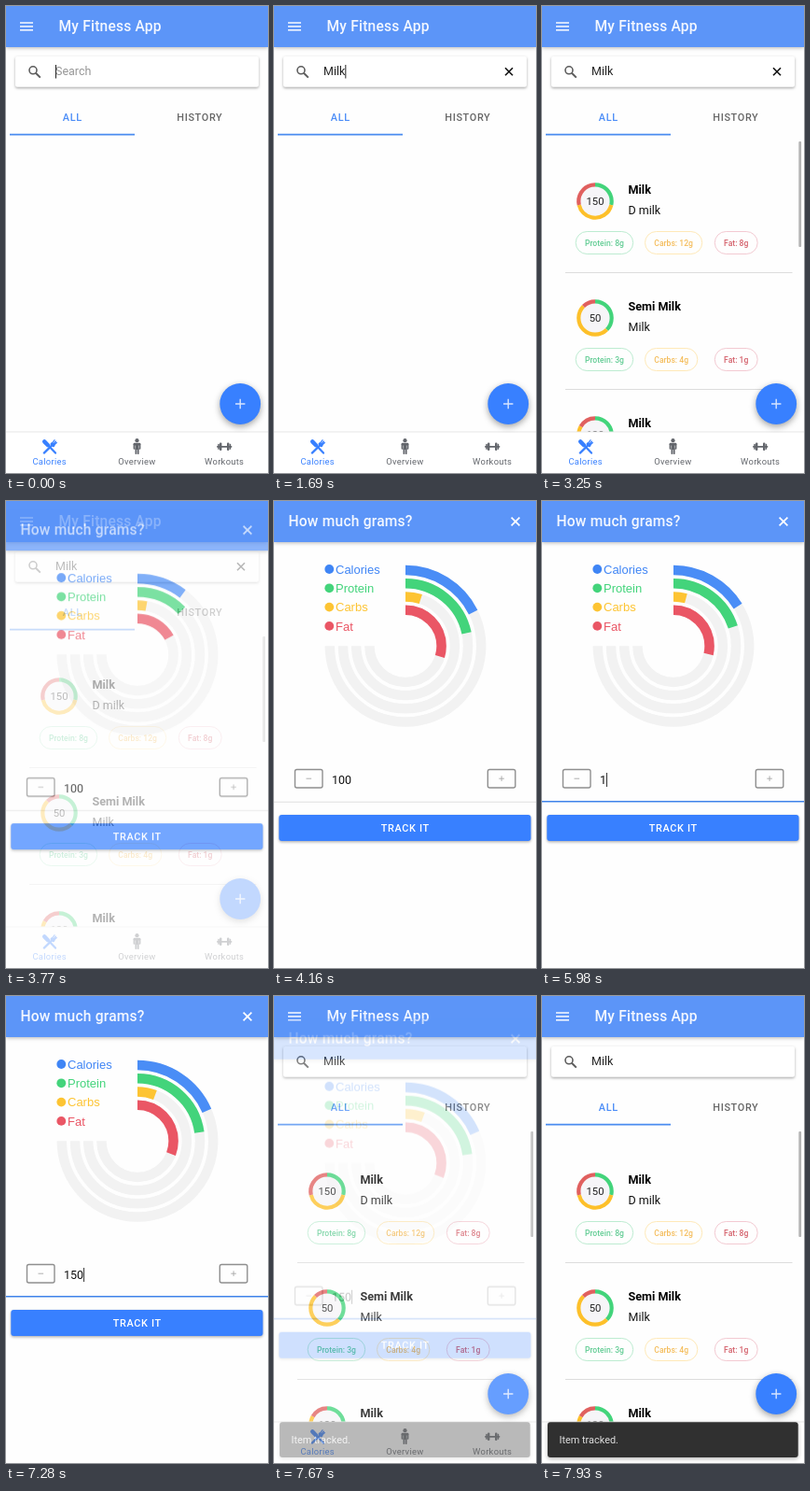
These frames come from a looping animation (281x500 px, 8 s). An HTML page with a canvas:

```html
<!DOCTYPE html>
<html lang="en">
<head>
<meta charset="utf-8">
<title>Fitness app</title>
<style>
html, body { margin: 0; width: 100%; height: 100%; overflow: hidden; background: #fff; }
canvas { display: block; width: 281px; height: 500px; }
</style>
</head>
<body>
<canvas id="stage"></canvas>
<script>
const W = 281, H = 500, LOOP = 8000, STEP = 130;
const BLUE = '#3880ff', BAR = '#5c95f8', GREEN = '#43d47b', YELLOW = '#fdc433', RED = '#ea5665';
const dpr = window.devicePixelRatio || 1;

function setup(canvas) {
  canvas.width = Math.round(W * dpr);
  canvas.height = Math.round(H * dpr);
  const ctx = canvas.getContext('2d');
  ctx.scale(dpr, dpr);
  return ctx;
}
const screen = setup(document.getElementById('stage'));
const buffer = setup(document.createElement('canvas'));
let c = screen;

const clamp = x => Math.max(0, Math.min(1, x));
const easeOut = x => 1 - Math.pow(1 - clamp(x), 3);
const mix = (a, b, p) => a.map((v, i) => v + (b[i] - v) * p);

// ---- drawing helpers ----
function text(s, x, y, size, color, { weight = 400, align = 'left', gap = 0, family = 'Roboto' } = {}) {
  c.font = `${weight} ${size}px ${family}, sans-serif`;
  c.letterSpacing = gap + 'px';
  c.textAlign = 'left';
  c.fillStyle = color;
  const w = c.measureText(s).width;
  c.fillText(s, align === 'center' ? x - (w - gap) / 2 : x, y);
  c.letterSpacing = '0px';
  return w;
}

function rect(x, y, w, h, color, r = 0) {
  c.fillStyle = color;
  c.beginPath();
  c.roundRect(x, y, w, h, r);
  c.fill();
}

function outline(x, y, w, h, color, r, width) {
  c.strokeStyle = color;
  c.lineWidth = width;
  c.beginPath();
  c.roundRect(x, y, w, h, r);
  c.stroke();
}

function line(color, width, ...pts) {
  c.strokeStyle = color;
  c.lineWidth = width;
  c.beginPath();
  for (let i = 0; i < pts.length; i += 4) {
    c.moveTo(pts[i], pts[i + 1]);
    c.lineTo(pts[i + 2], pts[i + 3]);
  }
  c.stroke();
}

function disc(x, y, r, color) {
  c.fillStyle = color;
  c.beginPath();
  c.arc(x, y, r, 0, Math.PI * 2);
  c.fill();
}

// Angles in degrees, clockwise from the top.
function arc(x, y, r, from, to, width, color) {
  if (to <= from) return;
  c.strokeStyle = color;
  c.lineWidth = width;
  c.beginPath();
  c.arc(x, y, r, (from - 90) * Math.PI / 180, (to - 90) * Math.PI / 180);
  c.stroke();
}

function shadowed(blur, dy, alpha, draw) {
  c.save();
  c.shadowColor = `rgba(0,0,0,${alpha})`;
  c.shadowBlur = blur * dpr;
  c.shadowOffsetY = dy * dpr;
  draw();
  c.restore();
}

const cross = (x, y, r, color, w) => line(color, w, x - r, y - r, x + r, y + r, x - r, y + r, x + r, y - r);

function group(alpha, dy, draw) {
  if (alpha <= 0) return;
  buffer.clearRect(0, 0, W, H);
  c = buffer;
  draw();
  c = screen;
  c.globalAlpha = alpha;
  c.drawImage(buffer.canvas, 0, dy, W, H);
  c.globalAlpha = 1;
}

function header(title, x) {
  shadowed(4, 1.2, 0.28, () => rect(0, 0, W, 43.9, BAR));
  text(title, x, 27.3, 15.6, '#f3f7ff', { weight: 500, gap: 0.2 });
}

// ---- main page ----
function searchBar(query, caret, clear) {
  shadowed(3, 1.2, 0.34, () => rect(10, 54, 261, 32.7, '#fff', 2));
  c.strokeStyle = '#5c5c5c';
  c.lineWidth = 1.6;
  c.beginPath();
  c.arc(29, 68.8, 4, 0, Math.PI * 2);
  c.stroke();
  line('#5c5c5c', 2, 31.9, 71.7, 36.8, 76.6);
  let w = 0;
  if (query) w = text(query, 53, 74.1, 12.5, '#222');
  else text('Search', 53, 74.1, 12.5, '#969696');
  if (caret) rect(53 + w, 63, 1, 14.5, '#222');
  if (clear) cross(252, 70.3, 4, '#111', 1.6);
}

function segments() {
  text('ALL', 71, 123.3, 10.9, '#4a8cf7', { weight: 500, align: 'center', gap: 0.66 });
  text('HISTORY', 207.5, 123.3, 10.9, '#666', { weight: 500, align: 'center', gap: 0.66 });
  rect(4, 136.8, 134, 1.6, '#4a8cf0');
}

const FOODS = [
  { name: 'Milk', note: 'D milk', kcal: 150, grams: [8, 12, 8] },
  { name: 'Semi Milk', note: 'Milk', kcal: 50, grams: [3, 4, 1] },
  { name: 'Milk', note: 'Milk', kcal: 120, grams: [8, 12, 4] }
];
const CHIPS = [
  ['Protein', 36.2, '#62cc94', '#bdecd1'],
  ['Carbs', 110.5, '#f4bd5c', '#ffe9b8'],
  ['Fat', 185.3, '#d4626c', '#f3cad2']
];

function foodRow(food, y, sweep) {
  const total = food.grams.reduce((a, b) => a + b);
  disc(57, y, 17, '#f6f5f8');
  let from = 0;
  food.grams.forEach((g, i) => {
    const to = from + g / total * 360 * sweep;
    arc(57, y, 17.7, from, to, 4.2, [GREEN, '#fdc02a', '#e0605f'][i]);
    from = to;
  });
  text(food.kcal, 57, y + 4.1, 11.3, '#222', { align: 'center' });
  text(food.name, 92.5, y - 8, 12.6, '#000', { weight: 700 });
  text(food.note, 92.5, y + 14.2, 12.5, '#111');
  CHIPS.forEach(([label, x, ink, edge], i) => {
    const w = text(`${label}: ${food.grams[i]}g`, x + 9.8, y + 47.8, 8.6, ink, { weight: 500 });
    outline(x, y + 32.5, w + 19.6, 24, edge, 12, 1);
  });
  rect(25, y + 76, 243.5, 1, '#dcdcdc');
}

function foodList(sweep) {
  c.save();
  c.beginPath();
  c.rect(0, 139, W, 317);
  c.clip();
  FOODS.forEach((food, i) => foodRow(food, 209 + i * 125, sweep));
  c.restore();
  rect(275.3, 145, 2.8, 113, '#b4b4b4', 1);
}

function cutleryIcon() {
  c.lineCap = 'round';
  line(BLUE, 2.2, 41, 466, 53, 478.6);
  line(BLUE, 4.4, 41.2, 466.4, 45, 470.2);
  line(BLUE, 2.2, 40.8, 478.6, 50, 469.6);
  line(BLUE, 1.3, 49, 468.6, 52, 464.8, 50.6, 469.2, 53.4, 466.2, 51, 470.6, 54.4, 467.6);
  line(BLUE, 3.4, 49.2, 469, 50.8, 470.4);
  c.lineCap = 'butt';
}

function manIcon(ink) {
  disc(140.5, 465.2, 2.1, ink);
  rect(136.6, 467.8, 7.8, 2.6, ink, 1.3);
  rect(136.6, 468.6, 1.5, 6.2, ink, 0.7);
  rect(142.9, 468.6, 1.5, 6.2, ink, 0.7);
  rect(138.5, 468, 4, 7, ink);
  rect(138.5, 473, 1.8, 7, ink, 0.7);
  rect(140.8, 473, 1.8, 7, ink, 0.7);
}

function barbellIcon(ink) {
  rect(226, 470.9, 16.4, 1.8, ink, 0.8);
  for (const x of [229, 237]) rect(x, 467.6, 2.4, 8.4, ink, 1);
  for (const x of [227.2, 239.6]) rect(x, 468.8, 1.6, 6, ink, 0.6);
}

function tabBar() {
  rect(0, 456, W, 44, '#fff');
  rect(0, 455.5, W, 1, '#e8e8e8');
  const ink = '#63666c';
  cutleryIcon();
  manIcon(ink);
  barbellIcon(ink);
  [['Calories', 46.5, BLUE], ['Overview', 140.3, ink], ['Workouts', 234, ink]].forEach(([s, x, color]) =>
    text(s, x, 490.8, 9.4, color, { align: 'center', gap: 0.28 }));
}

function addButton() {
  shadowed(7, 2.5, 0.36, () => disc(251.2, 426, 21.9, BLUE));
  line('#d6e4ff', 1.4, 246, 426, 256.4, 426, 251.2, 420.8, 251.2, 431.2);
}

function mainPage(t) {
  rect(0, 0, W, H, '#fefefe');
  header('My Fitness App', 56.5);
  for (const y of [18, 21.9, 25.8]) line('#f3f7ff', 1.56, 15, y, 29, y);
  const query = t < 1300 ? '' : t < 1430 ? 'M' : t < 1690 ? 'Mil' : 'Milk';
  const caret = t < 520 || (t >= 1040 && t < 2210) || (t >= 2730 && t < 3250);
  searchBar(query, caret, query && t < 7500);
  segments();
  if (t >= 2080) foodList(easeOut((t - 1950) / 780));
  tabBar();
  addButton();
}

// ---- tracking sheet ----
const RINGS = [['Calories', '#4a8df6'], ['Protein', GREEN], ['Carbs', YELLOW], ['Fat', RED]];
const NONE = [0, 0, 0, 0];
const FIRST = [63.5, 78, 18, 107];
const LOW = [58.3, 72.3, 14.7, 103];
const LAST = [66.4, 82, 21, 111];

function ringAngles(t) {
  if (t < 5720) return mix(NONE, FIRST, easeOut((t - 3640) / 520));
  if (t < 6110) return mix(FIRST, LOW, easeOut((t - 5590) / 390));
  return mix(LOW, LAST, easeOut((t - 6110) / 650));
}

function chart(t) {
  const ends = ringAngles(t);
  RINGS.forEach(([label, color], i) => {
    const r = 81.2 - i * 14.2, y = 73 + i * 20.3;
    arc(141, 155.3, r, 0, 270, 10.5, '#f2f2f2');
    arc(141, 155.3, r, 0, ends[i], 10.5, color);
    const ink = i ? color : '#3f85f5';
    disc(59.3, y, 4.9, ink);
    text(label, 66, y + 4.6, 13, ink, { family: '"Liberation Sans"' });
  });
}

function stepButton(x, plus) {
  outline(x, 287.5, 29.5, 19.5, '#8f8f8f', 2, 1.4);
  const cx = x + 14.8, cy = 297.2;
  line('#a8a8a8', 0.9, cx - 2.8, cy, cx + 2.8, cy);
  if (plus) line('#a8a8a8', 0.9, cx, cy - 2.8, cx, cy + 2.8);
}

function sheet(t) {
  rect(0, 0, W, H, '#fefefe');
  header('How much grams?', 15.5);
  cross(259, 22, 4.4, '#fff', 1.7);
  chart(t);
  stepButton(22.5, false);
  stepButton(229.3, true);
  const grams = t < 5720 ? '100' : t < 5850 ? '10' : t < 6110 ? '1' : t < 6240 ? '15' : '150';
  const w = text(grams, 62, 302.6, 12.5, '#111');
  const focus = t >= 5070;
  const caret = focus && !(t >= 5590 && t < 5720) && !(t >= 6760 && t < 7280);
  if (caret) rect(62 + w, 291, 1, 15, '#333');
  if (focus) rect(0, 320.9, W, 1.7, '#3f83ea');
  else rect(0, 321.8, W, 1, '#dedede');
  shadowed(3, 1.2, 0.32, () => rect(5.3, 336, 270.2, 28, BLUE, 3));
  text('TRACK IT', 140.5, 353.8, 10.9, '#fff', { weight: 500, align: 'center', gap: 0.66 });
}

function toast() {
  shadowed(4, 1.5, 0.3, () => rect(6, 456.3, 268.7, 37.8, '#303030', 3));
  text('Item tracked.', 18.5, 478.8, 10.9, '#dedede');
}

function draw(now) {
  const t = Math.floor((now % LOOP) / STEP) * STEP;
  c = screen;
  mainPage(t);
  if (t >= 3770 && t < 7800) {
    const shown = t < 7540 ? easeOut((t - 3640) / 390) : 1 - clamp((t - 7410) / 340);
    group(shown, 31 * (1 - shown), () => sheet(t));
  }
  if (t >= 7670) group(clamp((t - 7540) / 390), 0, toast);
  requestAnimationFrame(tick);
}

const start = performance.now();
function tick() { draw(performance.now() - start); }
tick();
</script>
</body>
</html>
```
